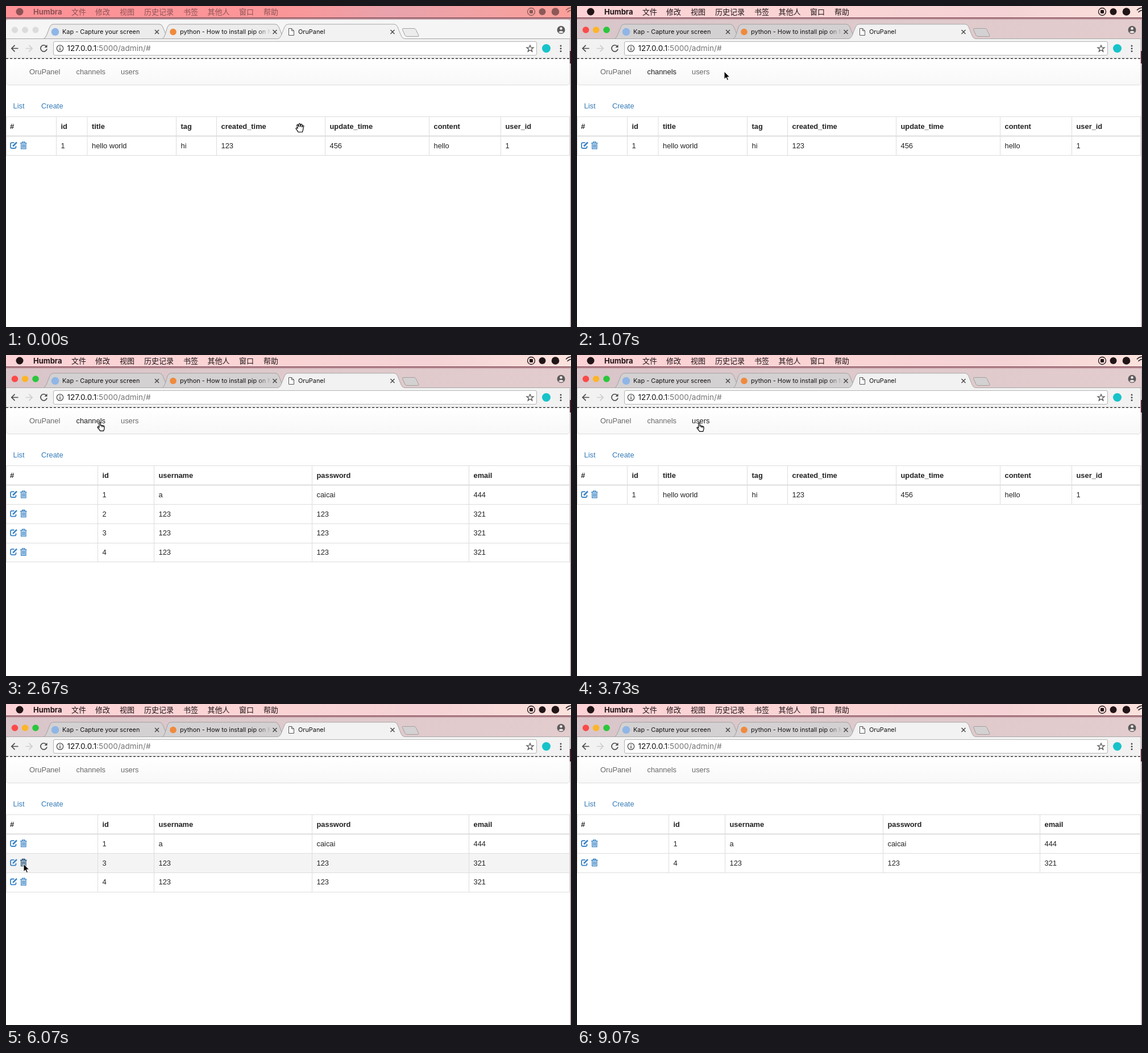
These frames come from a looping animation (994x564 px, 9190 ms). An HTML page:

```html
<!DOCTYPE html>
<html lang="zh-CN">
<head>
<meta charset="utf-8">
<title>Admin tables</title>
<style>
html, body { margin: 0; width: 100%; height: 100%; overflow: hidden; background: #fff; }
svg { display: block; }
text { white-space: pre; }
.page { font: 12.85px "Liberation Sans", Arial, sans-serif; fill: #222; }
.page .head { font-weight: 700; }
.page .nav { fill: #686868; }
.page .nav.on { fill: #1c1c1c; }
.page .link { fill: #337ab7; }
.tabs { font: 10.9px Inter, sans-serif; fill: #111; }
.url { font: 13.6px Inter, sans-serif; fill: #111; }
.menu { font: 13px "Noto Sans CJK SC", "Noto Sans CJK", sans-serif; fill: #201416; }
.menu .app { font: 700 13px Inter, sans-serif; }
.icon { fill: none; stroke: #4c4c4c; stroke-width: 1.7; }
.grid { fill: none; stroke: #ddd; }
.act { fill: none; stroke: #3a84c4; stroke-width: 1.8; }
.act.on { stroke: #23527c; }
</style>
</head>
<body>
<svg width="994" height="564" viewBox="0 0 994 564">
  <defs>
    <linearGradient id="warm">
      <stop offset="0" stop-color="#fd9196"/><stop offset=".5" stop-color="#fb9698"/>
      <stop offset=".68" stop-color="#e9a3ac"/><stop offset="1" stop-color="#fba09a"/>
    </linearGradient>
    <linearGradient id="pale">
      <stop offset="0" stop-color="#fbd3d6"/><stop offset=".5" stop-color="#fad4d5"/>
      <stop offset=".75" stop-color="#f4d2d5"/><stop offset="1" stop-color="#fbe2dd"/>
    </linearGradient>
    <linearGradient id="strip">
      <stop offset="0" stop-color="#d9c6ca"/><stop offset="1" stop-color="#e3cccd"/>
    </linearGradient>
    <linearGradient id="navbar" x2="0" y2="1">
      <stop offset="0" stop-color="#fff"/><stop offset="1" stop-color="#f8f8f8"/>
    </linearGradient>
    <linearGradient id="fade" gradientUnits="userSpaceOnUse" x1="440" x2="466">
      <stop offset="0" stop-color="#111"/><stop offset="1" stop-color="#111" stop-opacity="0"/>
    </linearGradient>
  </defs>

  <rect width="994" height="564" fill="#fff"/>

  <!-- menu bar -->
  <rect width="994" height="21" fill="url(#warm)"/>
  <rect id="palebar" width="994" height="21" fill="url(#pale)"/>
  <rect y="20" width="994" height="5" fill="#c9a3aa"/>
  <rect y="20" width="994" height="2" fill="#94606b"/>
  <g id="menu" class="menu">
    <circle cx="24" cy="10" r="6.5"/>
    <text class="app" x="48" y="14.5">Humbra</text>
    <text x="115" y="14.500">文件</text>
    <text x="157" y="14.500">修改</text>
    <text x="200" y="14.500">视图</text>
    <text x="243" y="14.500">历史记录</text>
    <text x="312" y="14.500">书签</text>
    <text x="354.500" y="14.500">其他人</text>
    <text x="410" y="14.500">窗口</text>
    <text x="453" y="14.500">帮助</text>
    <circle cx="924" cy="10" r="6.5" fill="none" stroke="#201416" stroke-width="1.3"/>
    <rect x="921" y="7" width="6" height="6" rx="1"/>
    <circle cx="943.500" cy="10" r="6"/>
    <circle cx="966.500" cy="10" r="6.8"/>
    <path d="M985 7.500Q989.500 3 995 3M987.500 11Q991 7.500 995 7.500" fill="none" stroke="#201416" stroke-width="1.6"/>
  </g>

  <!-- window frame -->
  <path d="M0 58V28Q0 24 4 24H988Q992 24 992 28V58Z" fill="#f5f5f5"/>
  <path id="strip-on" d="M0 58V28Q0 24 4 24H988Q992 24 992 28V58Z" fill="url(#strip)"/>
  <g fill="#dcdcdc"><circle cx="15.500" cy="42" r="5.5"/><circle cx="33.500" cy="42" r="5.5"/><circle cx="52" cy="42" r="5.5"/></g>
  <g id="lights"><circle cx="15.500" cy="42" r="5.8" fill="#fc4a48"/><circle cx="33.500" cy="42" r="5.8" fill="#fdb528"/><circle cx="52" cy="42" r="5.8" fill="#2bc63c"/></g>

  <g class="tabs">
    <g id="back-tabs" stroke="#a3a0a1" fill="#d4d1d2">
      <path d="M65 58Q69 57 71 52L77 37Q79 32 83 32H270Q274 32 276 37L282 52Q284 57 288 58Z"/>
      <path d="M274 58Q278 57 280 50L284 37Q286 32 290 32H474Q478 32 480 37L486 52Q488 57 492 58Z"/>
      <path d="M699 39.500H718Q720 39.500 721 41.500L726 51.500Q727 53.500 724 53.500H706Q703 53.500 702 51.500L697.500 41.500Q697 39.500 699 39.500Z"/>
    </g>
    <path d="M0 57.500H478Q482 57 484 52L490 37Q492 32 496 32H683Q687 32 689 37L695 52Q697 57 701 57.500H992V92H0Z" fill="#f2f2f2" stroke="#a9a6a7"/>
    <circle cx="86.500" cy="45.500" r="6.8" fill="#8fb6e6"/>
    <circle cx="294" cy="45.500" r="5.8" fill="#f08a3c"/>
    <path d="M497.500 39.500H502.500L506.500 43.500V51.500H497.500ZM502.500 39.500V43.500H506.500" fill="#fff" stroke="#555"/>
    <text x="99" y="49">Kap - Capture your screen</text>
    <text x="306" y="49" fill="url(#fade)">python - How to install pip on M</text>
    <text x="514" y="49">OruPanel</text>
    <path d="M262 42l7 7m0-7l-7 7M469.500 42l7 7m0-7l-7 7M676.500 42l7 7m0-7l-7 7" stroke="#4a4a4a" stroke-width="1.5"/>
    <circle cx="976.500" cy="42" r="7" fill="#5d5a5b"/>
    <circle cx="976.500" cy="39.500" r="2.3" fill="#f0eaeb"/>
    <path d="M972 46Q976.500 41.500 981 46Q976.500 49.500 972 46Z" fill="#f0eaeb"/>
  </g>

  <!-- toolbar -->
  <rect x="83.500" y="62.500" width="850" height="24" rx="2.500" fill="#fff" stroke="#b4b4b4"/>
  <g class="icon">
    <path d="M21.500 74.500H10M15.500 68.800L9.800 74.500L15.500 80.200"/>
    <path d="M34.500 74.500H46M40.500 68.800L46.200 74.500L40.500 80.200" stroke="#cfcfcf"/>
    <path d="M71 71A5.600 5.600 0 1 0 72 75.500"/>
    <path d="M72.500 68V73H67.500Z" fill="#4c4c4c" stroke="none"/>
    <circle cx="95" cy="74.500" r="5.700" stroke-width="1.300"/>
    <path d="M95 73.500V78M95 70.700V72.200" stroke-width="1.500"/>
    <path d="M922 69L923.600 73H928L924.500 75.700L925.800 80L922 77.400L918.200 80L919.500 75.700L916 73H920.400Z" stroke-width="1.200"/>
    <g fill="#4c4c4c" stroke="none"><circle cx="976" cy="70" r="1.500"/><circle cx="976" cy="74.700" r="1.500"/><circle cx="976" cy="79.400" r="1.500"/></g>
  </g>
  <circle cx="950.500" cy="74.500" r="7.500" fill="#17c3c9"/>
  <text class="url" x="107.500" y="79">127.0.0.1<tspan fill="#757575">:5000/admin/#</tspan></text>

  <!-- page -->
  <g class="page">
    <path d="M0 93H992V135Q992 139 988 139H4Q0 139 0 135Z" fill="url(#navbar)"/>
    <path d="M.5 93V135Q.5 138.500 4 138.500H988Q991.500 138.500 991.500 135V93" fill="none" stroke="#e4e4e4"/>
    <path d="M3 139.800H989" stroke="#f3f3f3"/>
    <path d="M0 92.300H992" stroke="#fff" stroke-width="1.300"/>
    <path d="M0 92.300H992" stroke="#222" stroke-width="1.300" stroke-dasharray="4 3"/>
    <text class="nav" x="41" y="120">OruPanel</text>
    <text class="nav" id="channels" x="123.500" y="120">channels</text>
    <text class="nav" id="users" x="202" y="120">users</text>
    <text class="link" x="12.500" y="180">List</text>
    <text class="link" x="62" y="180">Create</text>
    <g id="table"></g>
  </g>

  <path d="M992.500 24V564" stroke="#d8ced1"/>
  <path d="M993.500 24V564" stroke="#b5a0a7"/>
  <path d="M993 79V101" stroke="#54202f" stroke-width="2"/>

  <g id="cursor">
    <path id="arrow" d="M0 0V13.600L3.200 10.700L5.300 15.500L7.500 14.500L5.400 9.900H9.700Z" fill="#000" stroke="#fff" stroke-width="1"/>
    <path id="hand" transform="translate(-4.200 0)" fill="#fff" stroke="#000" stroke-width="1.200" d="M3 8.500V1.500Q3 0 4.200 0T5.400 1.500V5.700Q6.500 4.800 7.700 5.900Q8.900 5.200 9.900 6.500Q11.700 6 12.200 8V11Q11.800 13.200 10.900 15.300H4.800Q3.600 12.800 .7 10Q-.3 8.300 1 7.900Q2 7.900 3 9.200ZM7.700 6V8.500M9.900 6.700V8.700"/>
    <path id="grab" transform="translate(-7.500 -8)" fill="#fff" stroke="#000" stroke-width="1.200" d="M4.500 15.500Q3 12.500 .8 9.800Q.3 8 2 8Q3 8.300 3.800 9.500L2.300 4Q2.300 2.300 3.500 2.300Q4.500 2.500 5.600 6.500L5.500 2Q5.700 .6 6.900 .6T8.200 2V6.500L9.200 2.500Q9.800 1.300 10.900 1.800T11.500 3.500L11 7L12.500 4.500Q13.500 3.500 14.300 4.500Q14.400 6 13.600 8Q13.300 12 11.800 15.500Z"/>
  </g>
</svg>
<script>
const LOOP = 9190, FPS = 15;
const $ = id => document.getElementById(id);

const views = {
  channels: {
    cols: [0, 88.5, 143, 299.5, 370.5, 561.5, 744.5, 870.5],
    head: ['#', 'id', 'title', 'tag', 'created_time', 'update_time', 'content', 'user_id'],
    rows: [['1', 'hello world', 'hi', '123', '456', 'hello', '1']]
  },
  users: {
    cols: [0, 161.5, 260.5, 538.5, 814.5],
    head: ['#', 'id', 'username', 'password', 'email'],
    rows: [['1', 'a', 'caicai', '444'], ...['2', '3', '4'].map(id => [id, '123', '123', '321'])]
  }
};

// step, x, y, shape
const path = [
  [0, 517, 214, 'grab'], [1, 514, 218, 'arrow'], [3, 505, 231, 'arrow'], [7, 505, 231, 'arrow'],
  [12, 155, 118, 'hand'], [13, 175, 117, 'arrow'], [16, 259, 115, 'arrow'], [18, 259, 115, 'arrow'],
  [20, 218, 119, 'hand'], [29, 216, 119, 'hand'], [32, 190, 124, 'arrow'], [34, 165, 118, 'hand'],
  [44, 165, 118, 'hand'], [45, 140, 140, 'arrow'], [49, 24, 232, 'arrow'], [53, 215, 119, 'hand'],
  [58, 215, 119, 'hand'], [59, 180, 160, 'arrow'], [63, 22, 336, 'arrow'], [66, 22, 336, 'arrow'],
  [67, 19, 301, 'arrow'], [71, 14, 274, 'hand'], [76, 30, 279, 'hand'], [89, 30, 279, 'hand'],
  [90, 28, 300, 'arrow'], [91, 31, 281, 'arrow'], [104, 31, 281, 'arrow'], [107, -20, 284, 'arrow']
];

const clamp = v => Math.max(0, Math.min(1, v));
const within = (v, a, b) => v >= a && v < b;
const rowTop = i => 228.5 + i * 33.7;

function cursorAt(step) {
  let i = path.length - 1;
  while (path[i][0] > step) i--;
  const a = path[i], b = path[i + 1] || a;
  const p = b === a ? 0 : (step - a[0]) / (b[0] - a[0]);
  return { x: a[1] + (b[1] - a[1]) * p, y: a[2] + (b[2] - a[2]) * p, shape: a[3] };
}

function actions(y, c, hot) {
  const on = a => hot && within(c.x, ...a) ? 'act on' : 'act';
  return `<g transform="translate(0 ${y})">
    <path class="${on([7, 17])}" d="M14.500 11.600H10.500Q8 11.600 8 14V19Q8 21.500 10.500 21.500H15Q17.500 21.500 17.500 19V17.500"/>
    <path class="${on([7, 17])}" style="stroke-width:2.600" d="M12 18L19 11"/>
    <path class="${on([25, 37])}" style="stroke-width:1.300" d="M25 12.300H36.500M28.500 12V10.300H33V12M26.600 12.500V22.400H35V12.500M28.800 14V21M30.800 14V21M32.800 14V21"/>
  </g>`;
}

function table(name, gone, c) {
  const { cols, head, rows } = views[name];
  const shown = rows.filter(r => !gone.includes(r[0]));
  const end = rowTop(shown.length);
  const cell = (s, i, y, cls = '') => `<text class="${cls}" x="${cols[i] + (i ? 8 : 7)}" y="${y}">${s}</text>`;
  let out = '', lines = 'M0 194.500H992';
  shown.forEach((row, i) => {
    const y = rowTop(i), hot = within(c.y, y, y + 33.7) && c.x >= 0;
    if (hot) out += `<rect y="${y}" width="992" height="33.700" fill="#f4f4f4"/>`;
    out += actions(y, c, hot) + row.map((s, j) => cell(s, j + 1, y + 21.5)).join('');
    lines += `M0 ${Math.round(y + 33.7) + .5}H992`;
  });
  lines += [.5, ...cols.slice(1), 991.5].map(x => `M${x} 194.500V${end}`).join('');
  return out + head.map((s, i) => cell(s, i, 216, 'head')).join('') +
    `<path class="grid" d="${lines}"/><path class="grid" stroke-width="1.800" d="M0 228.500H992"/>`;
}

function draw(step) {
  const c = cursorAt(step);
  const active = clamp(step / 3);
  $('menu').style.opacity = .5 + active / 2;
  $('lights').style.opacity = $('strip-on').style.opacity = active;
  $('back-tabs').setAttribute('fill', active < .5 ? '#ececec' : '#d4d1d2');
  $('palebar').style.opacity = clamp((step - 7) / 9);

  // links stay dark while hovered or focused
  const onNav = (a, b) => within(c.y, 105, 128) && within(c.x, a, b);
  const focus = within(step, 12, 26) || within(step, 40, 56) ? 'channels'
    : within(step, 26, 40) || within(step, 56, 82) ? 'users' : '';
  $('channels').classList.toggle('on', focus === 'channels' || onNav(120, 178));
  $('users').classList.toggle('on', focus === 'users' || onNav(198, 236));

  const name = within(step, 28, 42) || step >= 58 ? 'users' : 'channels';
  const gone = step >= 101 ? ['2', '3'] : step >= 84 ? ['2'] : [];
  $('table').innerHTML = table(name, gone, c);

  $('cursor').setAttribute('transform', `translate(${c.x} ${c.y})`);
  for (const s of ['arrow', 'hand', 'grab']) $(s).style.display = s === c.shape ? '' : 'none';
}

let last = -1;
const start = performance.now();
function tick() {
  const t = (performance.now() - start) % LOOP;
  const step = Math.floor((t + 5) * FPS / 1000);
  if (step !== last) draw(last = step);
  requestAnimationFrame(tick);
}
tick();
</script>
</body>
</html>
```
